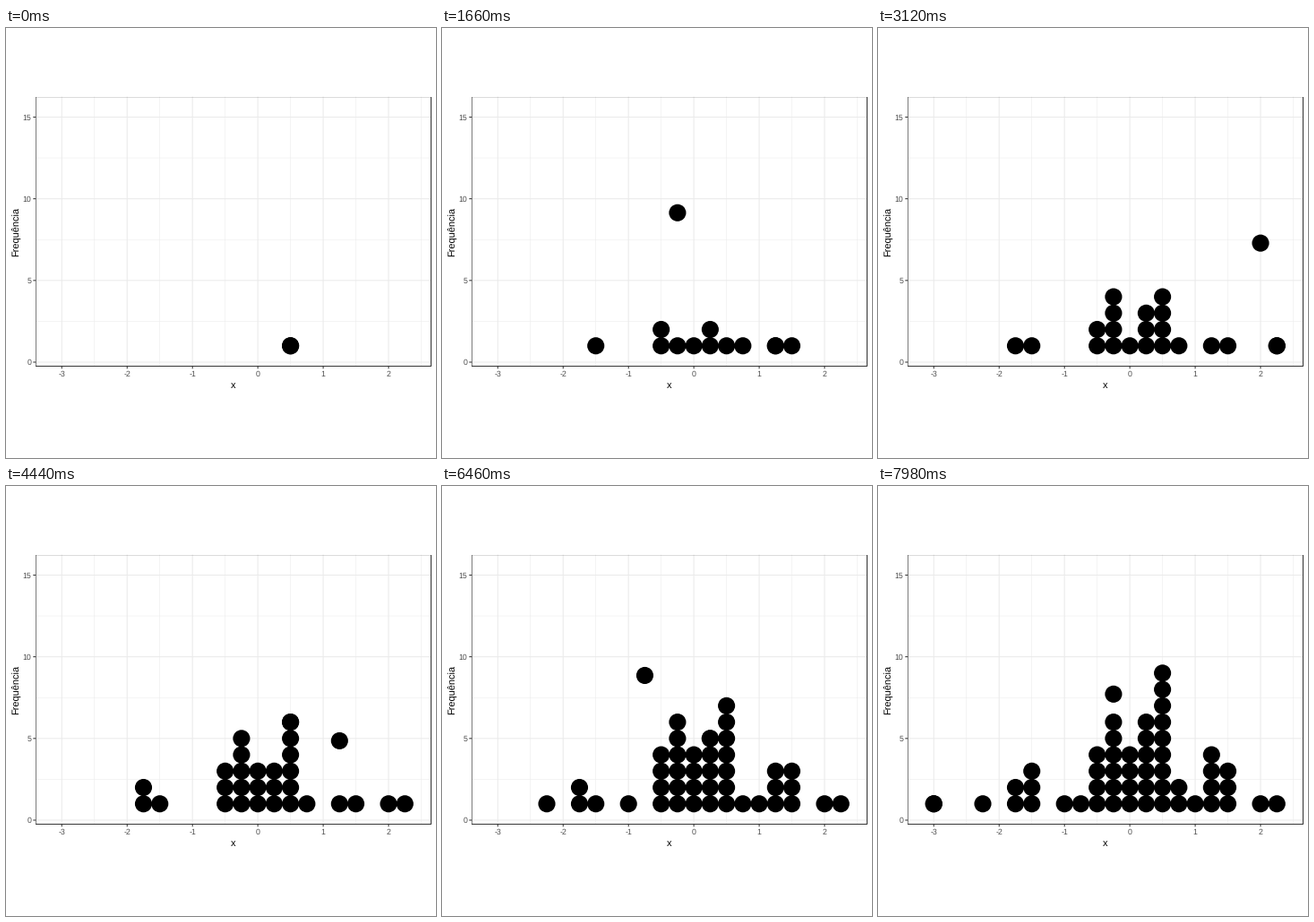
These frames come from a looping animation (480x480 px, 8000 ms). A matplotlib script:

```python
import matplotlib.pyplot as plt
from matplotlib.animation import FuncAnimation
from matplotlib.patches import Circle, Rectangle

SIZE, DPI = 480, 72
FRAMES, INTERVAL, CYCLE = 400, 20, 8
X0, Y0 = 281.13, 373.0          # pixel position of the data point (0, 0)
UX = 72.95
UY = UX / 4
LEFT, RIGHT, TOP, BOTTOM = 33.1, 474.5, 76.64, 377.56
RADIUS, START = 9.56, 12

# Column of each dot, in quarters of a unit, in order of arrival
QUARTERS = [
    2,
    1, 6, -2, 3, 0, -1, -6, -2, 1, 5,
    -1, 2, -1, -1, -7, 2, 1, 2, 9,
    8, 0, 2, -7, -1, -2, 0, 2,
    5, 5, -4, -1, 4, -9, 2,
    -2, 0, 6, 1, 6, 1,
    -3, 2, -6, 5, 2, 1, -6, 3, -12,
    -1,
]

plt.rcParams["font.family"] = "Liberation Sans"
plt.rcParams["text.hinting"] = "none"


def px(x):
    return X0 + UX * x


def py(y):
    return Y0 - UY * y


fig = plt.figure(figsize=(SIZE / DPI, SIZE / DPI), dpi=DPI, facecolor="white")
ax = fig.add_axes([0, 0, 1, 1])
ax.set_xlim(0, SIZE)
ax.set_ylim(SIZE, 0)
ax.axis("off")

panel = Rectangle((LEFT, TOP), RIGHT - LEFT, BOTTOM - TOP,
                  transform=ax.transData)


def line(xs, ys, color, width, z):
    ax.plot(xs, ys, color=color, lw=width, zorder=z, snap=False,
            solid_capstyle="butt")


def grid(xs, ys, width, z):
    for x in xs:
        line([px(x)] * 2, [TOP, BOTTOM], "#ebebeb", width, z)
    for y in ys:
        line([LEFT, RIGHT], [py(y)] * 2, "#ebebeb", width, z)


def label(x, y, text, size, color, **kw):
    ax.text(x, y, text, fontsize=size, color=color, va="baseline",
            rotation_mode="anchor", **kw)


x_ticks, y_ticks = range(-3, 3), range(0, 16, 5)
grid([x + 0.5 for x in x_ticks], [2.5, 7.5, 12.5], 0.53, 1)
grid(x_ticks, y_ticks, 1.07, 2)

for x in x_ticks:
    line([px(x)] * 2, [BOTTOM, BOTTOM + 2.75], "#333333", 1.07, 3)
    label(px(x), 388.8, str(x), 8.8, "#4d4d4d", ha="center")
for y in y_ticks:
    line([LEFT - 2.75, LEFT], [py(y)] * 2, "#333333", 1.07, 3)
    label(LEFT - 4.95, py(y) + 3.15, str(y), 8.8, "#4d4d4d", ha="right")

label((LEFT + RIGHT) / 2, 401.7, "x", 11, "black", ha="center")
label(13.4, (TOP + BOTTOM) / 2, "Frequência", 11, "black", ha="center",
      rotation=90)

border = Rectangle((LEFT, TOP), RIGHT - LEFT, BOTTOM - TOP, fill=False,
                   ec="#333333", lw=1.07, zorder=6, snap=False)
ax.add_patch(border)
border.set_clip_path(panel)


def make_dot():
    dot = Circle((0, 0), RADIUS, fc="black", lw=0, zorder=5, snap=False)
    return ax.add_patch(dot)


# Stack each dot on those already in its column
columns, heights = [], []
for i, q in enumerate(QUARTERS):
    columns.append(px(q / 4))
    heights.append(QUARTERS[:i + 1].count(q))

dots = [make_dot() for _ in QUARTERS]
newest = make_dot()             # second layer on the dot that landed last


def progress(landed, step):
    if landed == 0:
        return step / CYCLE
    return (step - 1) / (CYCLE - 1)


def update(n):
    landed, step = divmod(n, CYCLE)
    p = progress(landed, step)
    for i, dot in enumerate(dots):
        falling = i == landed + 1 and p > 0
        dot.set_visible(i <= landed or falling)
        h = START + (heights[i] - START) * p if falling else heights[i]
        dot.center = columns[i], py(h)
    newest.center = columns[landed], py(heights[landed])
    return dots + [newest]


anim = FuncAnimation(fig, update, frames=FRAMES, interval=INTERVAL,
                     init_func=lambda: update(0), repeat=True,
                     repeat_delay=0, blit=True)
plt.show()
```
